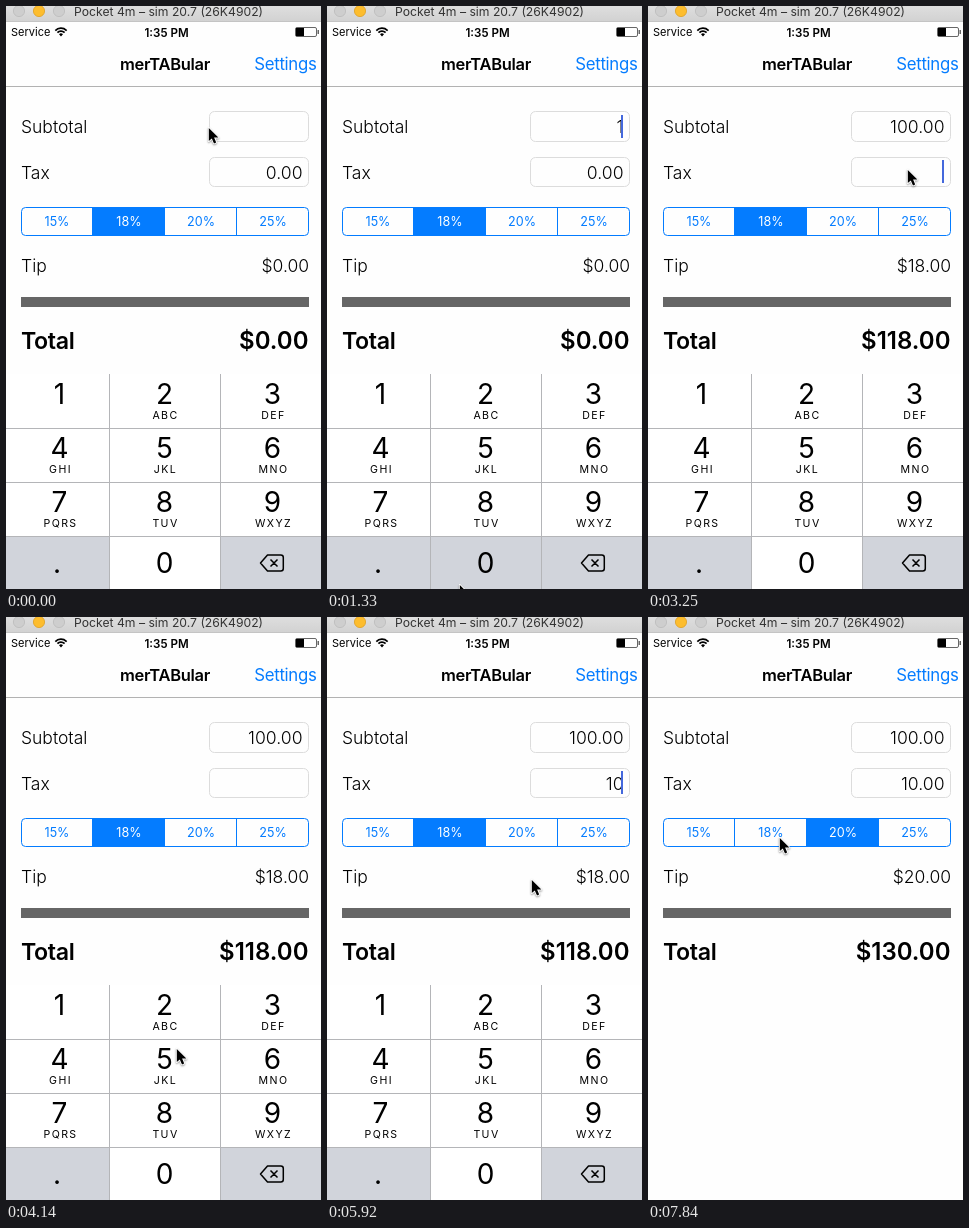
An HTML page with a canvas for the animation above (7.99 s loop, 315 px wide and 583 px high).

```html
<!DOCTYPE html>
<html lang="en">
<head>
<meta charset="utf-8">
<title>Tip calculator</title>
<style>
html, body { margin: 0; width: 100%; height: 100%; overflow: hidden; background: #fff; }
canvas { display: block; width: 315px; height: 583px; }
</style>
</head>
<body>
<canvas></canvas>
<script>
const W = 315, H = 583, LOOP = 7990, TICK = 148;
const BLUE = '#047cff', KEY_GRAY = '#d1d4db', LINE = '#b4b5b8';
const RATES = [15, 18, 20, 25];
const canvas = document.querySelector('canvas');
const ctx = canvas.getContext('2d');
const ratio = window.devicePixelRatio || 1;
canvas.width = W * ratio;
canvas.height = H * ratio;
ctx.scale(ratio, ratio);

// Where the pointer rests, in ticks of 148 ms; a tap falls in the middle of its rest.
const stops = [
  { from: 0, to: 1, x: 202, y: 121 },
  { from: 5, to: 5, x: 74, y: 396, tap: '1' },
  { from: 9, to: 9, x: 132, y: 578, tap: '0' },
  { from: 12, to: 12, x: 104, y: 558, tap: '0' },
  { from: 15, to: 15, x: 127, y: 349 },
  { from: 19, to: 23, x: 259, y: 163, tap: 'tax' },
  { from: 29, to: 30, x: 170, y: 432 },
  { from: 33, to: 33, x: 72, y: 396, tap: '1' },
  { from: 36, to: 36, x: 135, y: 556, tap: '0' },
  { from: 40, to: 40, x: 204, y: 262 },
  { from: 42, to: 44, x: 205, y: 238, tap: 'done' },
  { from: 47, to: 52, x: 188, y: 221, tap: '20%' },
  { from: 53, to: 54, x: 131, y: 220 }
];

const easeOut = k => 1 - (1 - k) ** 3;
const money = n => '$' + n.toFixed(2);

function pointerAt(tick) {
  const i = stops.findIndex(s => tick <= s.to);
  const next = stops[i], prev = stops[i - 1];
  if (tick >= next.from) return [next.x, next.y];
  const k = easeOut((tick - prev.to) / (next.from - prev.to));
  return [prev.x + (next.x - prev.x) * k, prev.y + (next.y - prev.y) * k];
}

// Replays the taps up to the given tick; each takes effect one tick after the press.
function stateAt(tick) {
  const s = { subtotal: '', tax: '0.00', field: 'subtotal', rate: 18, pressed: '',
    tip: 0, total: 0, blinkFrom: 1, closing: null };
  for (const { from, to, tap } of stops) {
    const press = Math.floor((from + to) / 2);
    if (!tap || tick < press) continue;
    if (tick === press) { s.pressed = tap; continue; }
    s.blinkFrom = press + 1;
    if (tap === '20%') s.rate = 20;
    else if (tap === 'tax' || tap === 'done') {
      s[s.field] = Number(s[s.field]).toFixed(2);
      s.field = tap === 'tax' ? 'tax' : '';
      if (tap === 'tax') s.tax = '';
      else s.closing = press;
    } else s[s.field] += tap;
    if (tap.length > 1) {
      s.tip = s.subtotal * s.rate / 100;
      s.total = Number(s.subtotal) + s.tip + Number(s.tax);
    }
  }
  const blinkOn = tick >= s.blinkFrom && (tick - s.blinkFrom) % 7 < 4;
  s.caret = s.field && (s.pressed || blinkOn);
  s.drop = s.closing ? easeOut(Math.min(1, (tick - s.closing) / 4)) : 0;
  return s;
}

function text(str, x, y, size, { weight = 400, align = 'left', color = '#000', spacing = 0 } = {}) {
  ctx.font = `${weight} ${size}px Inter, Roboto, sans-serif`;
  ctx.letterSpacing = spacing + 'px';
  ctx.textAlign = align;
  ctx.fillStyle = color;
  ctx.fillText(str, x, y);
}

function rect(x, y, w, h, color) {
  ctx.fillStyle = color;
  ctx.fillRect(x, y, w, h);
}

function outline(x, y, w, h, r, color) {
  ctx.beginPath();
  ctx.roundRect(x, y, w, h, r);
  ctx.strokeStyle = color;
  ctx.lineWidth = 1;
  ctx.stroke();
}

function drawWindowBar() {
  const shade = ctx.createLinearGradient(0, 0, 0, 15);
  shade.addColorStop(0, '#dedede');
  shade.addColorStop(1, '#d2d2d2');
  rect(0, 0, W, 15, shade);
  rect(0, 15, W, 1, '#c4c4c4');
  ['#cecece', '#fdbd2e', '#cecece'].forEach((color, i) => {
    ctx.beginPath();
    ctx.arc(13 + 20 * i, 5, 5.6, 0, 7);
    ctx.fillStyle = color;
    ctx.fill();
    ctx.strokeStyle = i === 1 ? '#dfa023' : '#bcbcbc';
    ctx.lineWidth = 0.8;
    ctx.stroke();
  });
  text('Pocket 4m – sim 20.7 (26K4902)', 68, 10, 12.2, { color: '#333' });
}

function drawStatusBar() {
  text('Service', 5, 30, 11);
  const wave = r => ctx.arc(55, 30, r, -Math.PI * 0.76, -Math.PI * 0.24);
  ctx.strokeStyle = ctx.fillStyle = '#000';
  ctx.lineWidth = 1.7;
  [7.8, 4.9].forEach(r => {
    ctx.beginPath();
    wave(r);
    ctx.stroke();
  });
  ctx.beginPath();
  ctx.moveTo(55, 30.5);
  wave(2.7);
  ctx.fill();
  text('1:35 PM', 160.5, 30.5, 11.6, { weight: 600, align: 'center' });
  outline(289.5, 21.5, 21, 9, 1.5, '#666');
  rect(290, 22, 8, 8, '#000');
  rect(311.5, 24, 1.5, 4, '#666');
}

function drawNavigation() {
  text('merTABular', 159, 64, 16.5, { weight: 600, align: 'center', spacing: -0.3 });
  text('Settings', 310.5, 64, 16.8, { align: 'right', color: BLUE, spacing: -0.3 });
  rect(0, 80, W, 1, '#b2b2b2');
}

function drawForm(state) {
  const label = { weight: 300 };
  const value = { weight: 300, align: 'right' };
  text('Subtotal', 15, 127, 17.5, label);
  text('Tax', 15, 173, 17.5, label);
  text('Tip', 15, 266, 17.5, label);
  outline(203.5, 105.5, 99, 30, 5, '#dcdcdc');
  outline(203.5, 151.5, 99, 29, 5, '#dcdcdc');
  text(state.subtotal, 296.5, 127, 17.6, value);
  text(state.tax, 296.5, 173, 17.6, value);
  if (state.caret) rect(294, state.field === 'tax' ? 154 : 109, 2, 23, '#4468dc');

  outline(15.5, 201.5, 287, 28, 4, BLUE);
  RATES.forEach((rate, i) => {
    const x = 15 + 72 * i, selected = rate === state.rate;
    if (selected) rect(x, 202, 72, 27, BLUE);
    if (i) rect(x - 1, 202, 1, 27, BLUE);
    text(rate + '%', x + 36, 220, 12.6, { align: 'center', color: selected ? '#fff' : BLUE });
  });

  text(money(state.tip), 303, 266, 17.5, value);
  rect(15, 291, 288, 10, '#666');
  text('Total', 15, 343, 23.2, { weight: 600, spacing: -0.4 });
  text(money(state.total), 302.5, 343, 24, { weight: 600, align: 'right' });
}

function drawDeleteIcon() {
  ctx.strokeStyle = '#000';
  ctx.lineWidth = 1.5;
  ctx.lineJoin = 'round';
  ctx.beginPath();
  ctx.moveTo(254.5, 557);
  ctx.lineTo(261.5, 549);
  ctx.arcTo(277.3, 549, 277.3, 557, 2.5);
  ctx.arcTo(277.3, 565, 261.5, 565, 2.5);
  ctx.lineTo(261.5, 565);
  ctx.closePath();
  ctx.moveTo(264.5, 553.5); ctx.lineTo(271.5, 560.5);
  ctx.moveTo(271.5, 553.5); ctx.lineTo(264.5, 560.5);
  ctx.stroke();
}

function drawKeyboard({ pressed, drop }) {
  const letters = ['', 'ABC', 'DEF', 'GHI', 'JKL', 'MNO', 'PQRS', 'TUV', 'WXYZ'];
  ctx.save();
  ctx.translate(0, 215 * drop);
  rect(0, 368, W, 215, '#fff');
  [...'123456789.0<'].forEach((key, i) => {
    const col = i % 3, row = Math.floor(i / 3);
    const left = col && 111 * col - 7, right = Math.min(W, 111 * col + 104);
    const top = 368 + 54 * row, center = 53.5 + 105 * col + 1.5 * col * (col - 1);
    if (key === pressed || key === '.' || key === '<') rect(left, top, right - left, 55, KEY_GRAY);
    if (key === '<') return drawDeleteIcon();
    text(key, key === '.' ? 51 : center, top + (row < 3 ? 30 : 37), 28, { align: 'center' });
    if (letters[i]) text(letters[i], center + 1, top + 45, 10.6, { align: 'center', spacing: 1.4 });
  });
  [103, 214].forEach(x => rect(x, 368, 1, 215, LINE));
  [422, 476, 530].forEach(y => rect(0, y, W, 1, LINE));
  ctx.restore();
}

function drawPointer([x, y]) {
  const arrow = new Path2D('M0 0V13L3 10.4L5.2 15.4L7.4 14.4L5.3 9.6H9.6Z');
  ctx.save();
  ctx.translate(Math.round(x) + 0.8, Math.round(y) + 1);
  ctx.lineJoin = 'round';
  ctx.lineWidth = 1.8;
  ctx.strokeStyle = '#fff';
  ctx.shadowColor = 'rgba(0, 0, 0, 0.4)';
  ctx.shadowBlur = 2;
  ctx.shadowOffsetY = 1;
  ctx.stroke(arrow);
  ctx.shadowColor = 'transparent';
  ctx.fillStyle = '#000';
  ctx.fill(arrow);
  ctx.restore();
}

function draw(time) {
  const tick = Math.floor((time % LOOP + 15) / TICK) % 54;
  const state = stateAt(tick);
  rect(0, 0, W, H, '#fefefe');
  drawWindowBar();
  drawStatusBar();
  drawNavigation();
  drawForm(state);
  if (state.drop < 1) drawKeyboard(state);
  drawPointer(pointerAt(tick));
}

let start;
function loop(now) {
  start ??= now;
  draw(now - start);
  requestAnimationFrame(loop);
}
requestAnimationFrame(loop);
</script>
</body>
</html>
```
